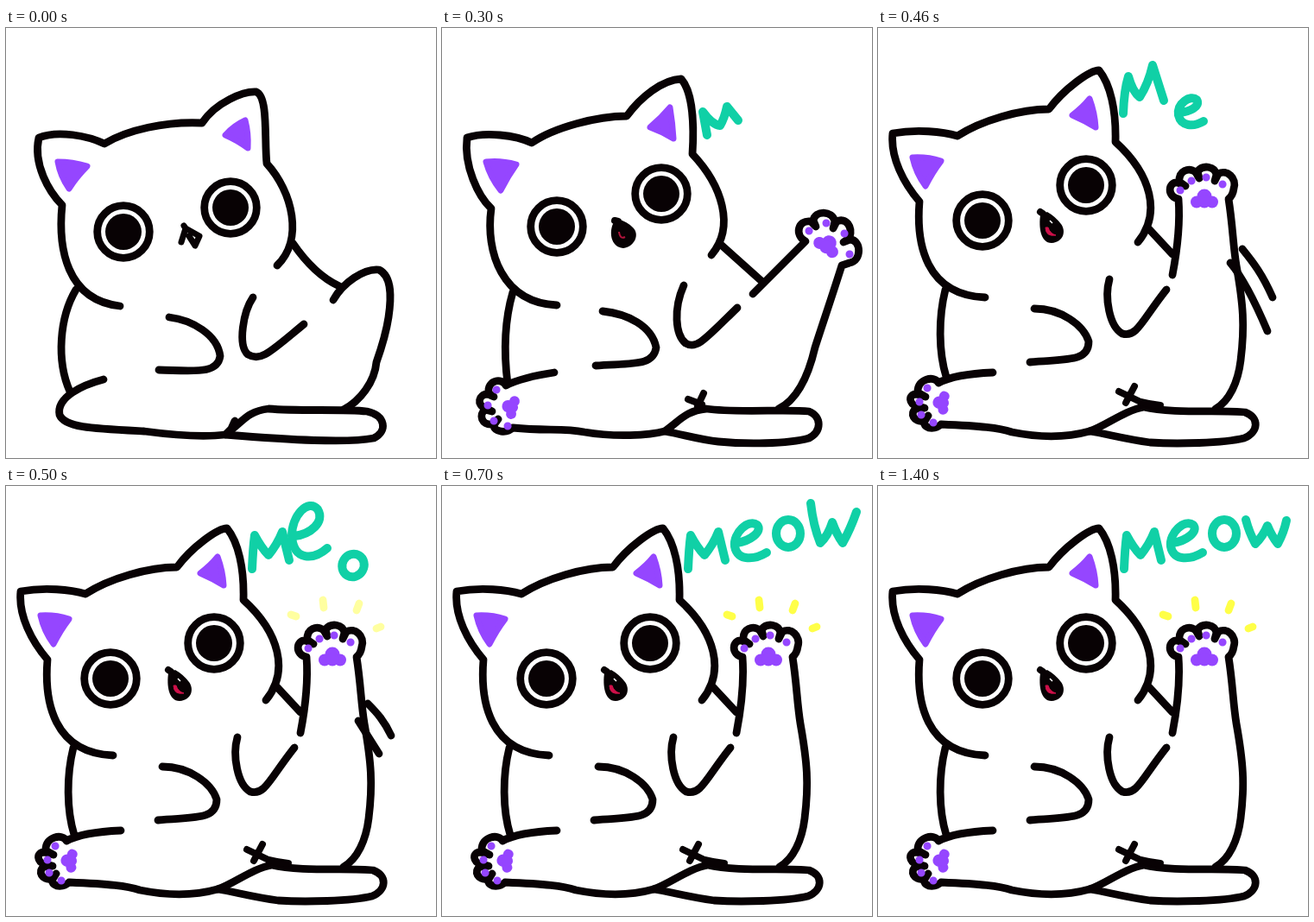
An HTML page that plays this animation: 498 px wide and 498 px high, repeating every 1800 ms.

```html
<!DOCTYPE html>
<html lang="en">
<head>
<meta charset="utf-8">
<title>Meow</title>
<style>
  html, body { margin: 0; width: 100%; height: 100%; overflow: hidden; background: #fff; }
  svg { display: block; width: 100vw; height: 100vh; }

  .ink, .word, .spark { fill: none; stroke-width: 8.8; stroke-linecap: round; stroke-linejoin: round; }
  .ink { stroke: #080204; }
  .word { stroke: #10d0a6; stroke-width: 10; }
  .spark { stroke: #ffff48; }
  .pale { stroke: #ffffa0; }
  .ear { fill: #9546ff; stroke: #9546ff; stroke-width: 7; stroke-linejoin: round; }
  .dots { fill: none; stroke: #9546ff; stroke-width: 9; stroke-linecap: round; }
  .pad { fill: #9546ff; }
  .solid { fill: #080204; }

  /* Each layer shows from --at for the length of its keyframes. */
  .show { visibility: hidden; animation: tick 1.8s step-end var(--at) infinite; }
  .rest { animation-name: rest; }
  .raised { animation-name: raised; }
  .glow { animation-name: glow; }
  .hold { animation-name: hold; }
  @keyframes tick   { 0% { visibility: visible } 5.5555%, 100% { visibility: hidden } }
  @keyframes rest   { 0% { visibility: visible } 16.6666%, 100% { visibility: hidden } }
  @keyframes raised { 0% { visibility: visible } 77.7777%, 100% { visibility: hidden } }
  @keyframes glow   { 0% { visibility: visible } 66.6666%, 100% { visibility: hidden } }
  @keyframes hold   { 0% { visibility: visible } 55.5555%, 100% { visibility: hidden } }
</style>
</head>
<body>
<svg viewBox="0 0 498 498">
  <defs>
    <g id="eye">
      <circle class="ink" r="30.3"/>
      <circle class="solid" r="21"/>
    </g>
    <g id="pad" class="pad">
      <circle cy="-4" r="8.5"/>
      <circle cx="-9" cy="2.5" r="7"/>
      <circle cx="9" cy="2.5" r="7"/>
      <circle cy="2" r="7.5"/>
    </g>
    <path id="sparks" d="M330 149L336 151M367 132L368 141M409 136L406 144M429 165L434 163"/>
    <path id="m" d="M285 96Q286 72 288 57Q296 72 304 80Q314 68 320 53Q324 70 328 86"/>
    <path id="e" d="M341 66C356 64 372 53 365 45C355 38 337 54 339 70C342 88 363 85 376 77"/>
  </defs>

  <!-- sitting -->
  <g class="show rest" style="--at: 0s">
    <path class="ear" d="M60 155Q77 155 94 160Q82 172 73 186Q63 172 60 155ZM254 124Q264 113 277 107Q281 122 280 139Q268 130 254 124Z"/>
    <g class="ink">
      <path d="M132 322C70 315 60 255 65 205C50 190 31 158 38 127C60 118 95 125 114 134C140 118 185 108 227 110C243 86 275 73 290 74C304 80 299 130 302 157C332 190 345 245 314 275"/>
      <path d="M332 249C345 268 362 288 386 299M379 315C390 295 415 278 432 280C448 288 446 315 443 335C440 355 435 370 429 387C427 410 410 432 391 442"/>
      <path d="M81 303C62 335 58 385 74 421M113 407C90 413 58 427 62 448C68 463 100 464 160 467C190 471 230 474 254 471"/>
      <path d="M265 455L260 466C275 455 280 444 304 441C340 444 390 441 418 444C440 449 442 467 426 475C395 481 330 477 254 471L262 463"/>
      <path d="M189 335C215 338 245 355 248 380C245 401 220 397 177 396M286 312C275 328 268 367 280 378C295 387 305 376 345 343"/>
      <path stroke-width="7" d="M206 229L208 232L203 248M208 232L224 241L219 252L212 241"/>
    </g>
    <use href="#eye" x="136" y="236"/>
    <use href="#eye" x="260" y="208"/>
  </g>

  <!-- leg swinging up -->
  <g class="show" style="--at: .3s">
    <path class="ear" d="M51 155Q68 153 86 158Q76 172 68 188Q56 173 51 155ZM241 115Q254 104 264 92Q267 110 268 128Q255 120 241 115Z"/>
    <g class="ink">
      <path d="M133 321C70 318 50 260 57 209C42 195 25 160 29 127C50 120 85 124 104 133C130 115 180 102 214 102C230 80 255 60 277 59C291 75 292 115 290 146C324 182 340 230 312 263"/>
      <path d="M322 250L370 293M360 308L421 247C408 240 412 222 427 224L433 230L430 223C432 211 452 211 455 224L453 232L457 224C468 219 476 230 472 243L465 248L473 245C486 246 486 270 472 272L463 275C452 310 440 345 432 370C425 400 412 430 390 441"/>
      <path d="M82 306C72 340 72 380 76 412M130 399C110 402 90 406 74 414C70 405 52 407 54 423L60 427L53 424C42 424 40 437 50 440L58 444L50 442C42 448 46 460 58 459L65 453L60 460C60 468 75 470 82 463C120 467 140 463 165 468C200 474 240 472 258 467"/>
      <path d="M258 467C275 455 283 443 306 441C340 446 400 441 425 444C440 450 440 467 425 475C400 482 350 482 320 479C300 477 280 471 258 467"/>
      <path d="M186 328C215 331 243 345 248 370C245 392 220 388 178 391M280 298C268 325 270 355 282 365C295 373 305 360 342 324"/>
      <path stroke-width="8" d="M285 430L301 436M303 423L296 438M200 223L204 224"/>
    </g>
    <path class="solid" d="M199 225C193 235 195 254 210 255C224 253 229 238 221 231Q214 224 205 222Z"/>
    <path d="M205 236Q206 245 212 242" fill="none" stroke="#b0143c" stroke-width="2"/>
    <path class="dots" d="M425 235h.1M445 226h.1M466 238h.1M472 262h.1"/>
    <path class="dots" stroke-width="8" d="M63 419h.1M53 437h.1M60 455h.1M76 461h.1"/>
    <use href="#pad" transform="translate(446 252) rotate(35)"/>
    <use href="#pad" transform="translate(80 439) rotate(-75) scale(.85)"/>
    <use href="#eye" x="133" y="230"/>
    <use href="#eye" x="254" y="192"/>
    <path class="word" d="M307 124L302 97Q313 112 322 113Q327 105 330 91L343 107"/>
  </g>

  <!-- leg raised -->
  <g class="show raised" style="--at: .4s">
    <path class="ear" d="M40 150Q57 149 73 154Q63 167 55 183Q44 168 40 150ZM225 101Q237 92 245 82Q251 98 252 115Q239 107 225 101Z"/>
    <g class="ink">
      <path d="M124 312C55 309 44 250 48 201C30 180 14 150 17 122C45 117 75 120 92 125C120 107 165 94 198 94C215 71 245 49 256 49C269 65 276 95 275 132C317 170 328 215 301 248"/>
      <path d="M314 233L341 262M341 286C346 260 350 225 348 198C334 195 336 178 347 179L356 183L349 178C348 165 360 161 368 167L372 174L370 166C377 158 390 160 392 170L390 177L394 169C404 163 416 174 412 186Q411 194 406 198C411 230 411 250 415 275C423 320 425 345 420 385C417 410 407 432 391 441"/>
      <path d="M78 303C70 335 70 375 79 404M133 399C110 400 85 403 70 411C66 402 45 406 46 422L55 427L45 424C34 424 36 436 45 438L54 440L44 441C36 446 42 457 52 455L58 449L53 457C56 466 68 464 73 459C120 461 140 463 155 468C190 475 220 474 245 467"/>
      <path d="M245 467C265 460 285 443 308 439C340 447 400 442 425 445C442 451 441 468 424 475C400 481 345 482 315 480C285 476 265 470 245 467"/>
      <path d="M181 325C212 325 238 344 244 363C244 388 215 383 176 387M268 291C262 312 268 346 283 354C300 359 306 338 334 303"/>
      <path stroke-width="8" d="M279 421L304 433Q316 436 327 437M297 415L287 434M188 213L191 215"/>
    </g>
    <path class="solid" d="M188 217C186 230 188 249 201 249C215 248 218 235 212 227Q205 218 196 213Z"/>
    <path d="M194 231Q194 242 206 240Q199 238 197 231Z" fill="#d0104a" stroke="#d0104a"/>
    <path d="M199 223L202 226" stroke="#fff" stroke-width="1.5"/>
    <path class="dots" d="M350 188h.1M363 177h.1M380 173h.1M399 181h.1"/>
    <path class="dots" stroke-width="8" d="M57 417h.1M48 433h.1M50 448h.1M64 457h.1"/>
    <use href="#pad" x="378" y="199"/>
    <use href="#pad" transform="translate(74 434) rotate(-85) scale(.85)"/>
    <use href="#eye" x="121" y="223"/>
    <use href="#eye" x="241" y="182"/>
  </g>

  <!-- swing lines -->
  <path class="ink show" style="--at: .4s" d="M408 272C425 292 440 325 451 351M422 256C435 272 445 285 457 312"/>
  <path class="ink show" style="--at: .5s" d="M408 272L432 310M419 252C430 263 438 272 446 289"/>

  <use href="#sparks" class="spark pale show" style="--at: .5s"/>
  <use href="#sparks" class="spark show glow" style="--at: .6s"/>

  <!-- lettering -->
  <path class="word show" style="--at: .4s" d="M284 99Q285 72 290 56Q295 74 303 80Q313 65 318 43Q325 65 331 84M349 98C361 97 374 91 369 83C362 77 346 87 348 101C351 114 365 115 377 108"/>
  <g class="word show" style="--at: .5s">
    <use href="#m"/>
    <path d="M334 58C352 56 370 42 361 27C350 14 331 34 331 58C333 87 356 86 372 72"/>
    <ellipse rx="12.5" ry="13.5" transform="translate(402 92) rotate(30)"/>
  </g>
  <g class="word show" style="--at: .6s">
    <use href="#m"/>
    <use href="#e"/>
    <ellipse rx="15" ry="24" transform="translate(400 48) rotate(8)"/>
    <path d="M430 83Q434 96 441 103Q448 100 451 91Q455 102 461 104Q468 96 468 83"/>
  </g>
  <g class="word show" style="--at: .7s">
    <use href="#m"/>
    <use href="#e"/>
    <ellipse cx="401" cy="55" rx="14" ry="16"/>
    <path d="M427 20Q430 46 438 66Q447 58 452 42Q457 56 464 66Q473 50 480 30"/>
  </g>
  <g class="word show hold" style="--at: .8s">
    <use href="#m"/>
    <use href="#e"/>
    <ellipse cx="401" cy="55" rx="14" ry="16"/>
    <path d="M426 39Q430 54 437 67Q446 58 451 46Q456 58 463 67Q470 54 473 40"/>
  </g>
</svg>
</body>
</html>
```
